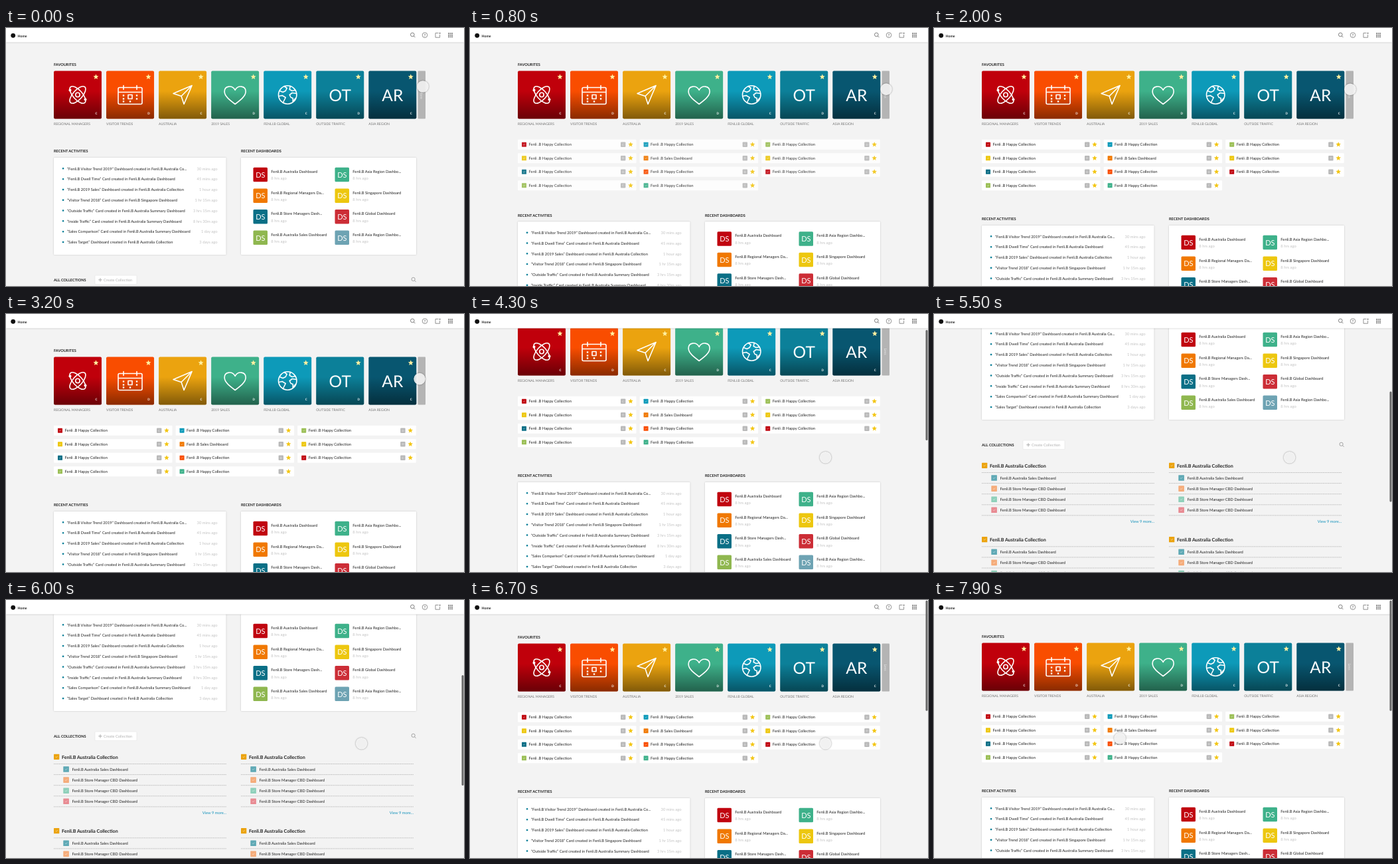
Animation, 690 px wide and 388 px high, one loop 8000 ms. Source, as an HTML page:

```html
<!DOCTYPE html>
<html lang="en">
<head>
<meta charset="utf-8">
<title>Dashboard home</title>
<style>
  html, body { margin: 0; width: 100%; height: 100%; overflow: hidden; background: #f3f3f3; }
  svg { display: block; width: 690px; height: 388px; font-family: Lato, sans-serif; text-rendering: geometricPrecision; }
  text { fill: #222; white-space: pre; }
  .bold { font-weight: 700; }
  .line { fill: none; stroke: #fff; stroke-width: 1.6; stroke-linecap: round; stroke-linejoin: round; }
  .tool { fill: none; stroke: #777; stroke-width: .8; }
  .panel { fill: #fff; filter: drop-shadow(0 .7px 1px #0003); }
  #cursor { fill: #fff; fill-opacity: .86; filter: drop-shadow(0 .5px 1.3px #0007); }
</style>
</head>
<body>
<svg viewBox="0 0 690 388">
  <defs>
    <linearGradient id="shade" x2="0" y2="1">
      <stop offset=".42" stop-opacity="0"/><stop offset="1" stop-opacity=".45"/>
    </linearGradient>
  </defs>
  <rect width="690" height="388" fill="#f3f3f3"/>
  <g id="page"><g id="favourites"></g><g id="extra"></g><g id="lower"></g></g>
  <g id="header"></g>
  <rect id="thumb" x="686.5" width="3" height="166" rx="1.5" fill="#686868"/>
  <circle id="cursor" r="8.8"/>
</svg>
<script>
const $ = id => document.getElementById(id);
const BRAND = 'Fenli.B';
const GREY = 'fill="#c2c2c2" style="fill:#c2c2c2"';
const END = 'text-anchor="end"', MID = 'text-anchor="middle"';
const ink = c => `style="fill:${c}"`;

// y is the middle of the capitals
const text = (x, y, size, str, attrs = '') =>
  `<text x="${x}" y="${y + size * .36}" font-size="${size}" ${attrs}>${str}</text>`;
const rect = (x, y, w, h, fill, r = 0, attrs = '') =>
  `<rect x="${x}" y="${y}" width="${w}" height="${h}" rx="${r}" fill="${fill}" ${attrs}/>`;
const path = (d, cls = 'line') => `<path class="${cls}" d="${d}"/>`;
const title = (x, y, str) => text(x, y, 5.6, str, 'class="bold"');
const star = (x, y, r, fill) => {
  const pts = Array.from({ length: 10 }, (_, i) => {
    const a = i * Math.PI / 5, q = i % 2 ? r * .45 : r;
    return `${x + q * Math.sin(a)},${y - q * Math.cos(a)}`;
  });
  return `<polygon points="${pts.join(' ')}" fill="${fill}"/>`;
};
const badge = (x, y, s, fill) => rect(x, y - s / 2, s, s, fill, .6) +
  `<path d="M${x + s * .32} ${y}l${s * .14} ${s * .13} ${s * .24} -${s * .26}" fill="none" stroke="#fffb" stroke-width=".6"/>`;

// Icons are centred on 0,0
const orbit = a => `<ellipse class="line" rx="16" ry="7" transform="rotate(${a})"/>`;
const letters = s => text(0, 0.3, 24.5, s, `${MID} ${ink('#fff')}`);
const icons = [
  orbit(48) + orbit(-48) + '<circle class="line" r="3.2"/>' +
    '<g fill="#fff"><circle cx="-11.5" cy="-7" r="2"/><circle cx="11.5" cy="7" r="2"/></g>',
  path('M-16 -11H16Q18 -11 18 -9V12Q18 14 16 14H-16Q-18 14 -18 12V-9Q-18 -11 -16 -11ZM-18 -4H18M-10 -14V-8M10 -14V-8') +
    path('M-3 0H3V6H-3Z') +
    [[-10, 1], [10, 1], [-10, 6], [10, 6], [-10, 10], [0, 10]].map(([x, y]) => rect(x - 1.2, y - 1.2, 2.4, 2.4, '#fff')).join(''),
  path('M14 -14L-14 -2L-2 2L2 14ZM-2 2L14 -14'),
  path('M0 14C-8 8 -16 2 -16 -5C-16 -14 -4 -15 0 -7C4 -15 16 -14 16 -5C16 2 8 8 0 14Z'),
  '<circle class="line" r="13.7"/>' +
    path('M-12 -6L-7 -4L-3 -6L-1 -10L-5 -13M-13 2L-8 1L-3 4L-5 8L-7 12M4 -13L3 -8L7 -6L12 -7M13 -2L7 -3L3 0L5 4L8 5L8 10L12 5'),
  letters('OT'), letters('AR')
];

const cards = [
  ['REGIONAL MANAGERS', '#c0000b'], ['VISITOR TRENDS', '#f94d00'], ['AUSTRALIA', '#eba30f'],
  ['2019 SALES', '#3eb18a'], [BRAND.toUpperCase() + ' GLOBAL', '#0d9ab9'],
  ['OUTSIDE TRAFFIC', '#0c8099'], ['ASIA REGION', '#085670']
];
$('favourites').innerHTML = title(72, 54.7, 'FAVOURITES') + cards.map(([name, fill], i) => {
  const x = 72 + 79.05 * i;
  return rect(x, 64.5, 72, 72, fill, 2) + rect(x, 64.5, 72, 72, 'url(#shade)', 2) +
    `<g transform="translate(${x + 36} 100.5)">${icons[i]}</g>` +
    star(x + 63.5, 73.5, 4.2, '#fff0a0') +
    text(x + 64, 128.3, 4.6, 'CD'[i % 2], `class="bold" ${MID} ${ink('#fff')}`) +
    text(x, 144.2, 5.15, name, ink('#777'));
}).join('') + rect(620.5, 64.5, 11.5, 72, '#b4b4b4', 1) +
  `<g transform="translate(626.3 100.5) rotate(90)"><text id="toggle" y="1.8" font-size="5.4" ${MID} ${ink('#e6e6e6')}></text></g>`;

const tints = ['#c0040f', '#0d9ab9', '#9bbf56', '#edc70f', '#f07800', '#edc70f', '#0a6f86', '#f94d00', '#c0040f', '#9bbf56', '#3eb18a'];
$('extra').innerHTML = tints.map((fill, i) => {
  const x = 72 + 183.6 * (i % 3), y = 175.2 + 20.55 * Math.floor(i / 3);
  return rect(x, y - 7.5, 178.5, 15, '#fff', 1) + badge(x + 6, y, 7, fill) +
    text(x + 16.5, y, 5.85, `Fenli .B ${i === 4 ? 'Sales Dashboard' : 'Happy Collection'}`) +
    rect(x + 155, y - 3.7, 7.4, 7.4, '#b9b9b9', 1) +
    text(x + 158.7, y, 4, 'CCDDDDDDCCC'[i], `${MID} ${ink('#eee')}`) +
    star(x + 170, y, 4, '#f3c614');
}).join('');

const activities = [
  [`“${BRAND} Visitor Trend 2019” Dashboard created in ${BRAND} Australia Co...`, '30 mins ago'],
  [`“${BRAND} Dwell Time” Card created in ${BRAND} Australia Dashboard`, '45 mins ago'],
  [`“${BRAND} 2019 Sales” Dashboard created in ${BRAND} Australia Collection`, '1 hour ago'],
  [`“Visitor Trend 2018” Card created in ${BRAND} Singapore Dashboard`, '1 hr 15m ago'],
  [`“Outside Traffic” Card created in ${BRAND} Australia Summary Dashboard`, '3 hrs 15m ago'],
  [`“Inside Traffic” Card created in ${BRAND} Australia Summary Dashboard`, '8 hrs 30m ago'],
  [`“Sales Comparison” Card created in ${BRAND} Australia Summary Dashboard`, '1 day ago'],
  [`“Sales Target” Dashboard created in ${BRAND} Australia Collection`, '3 days ago']
];
const dashboards = [
  ['Australia Dashboard', '#c0040f'], ['Asia Region Dashbo...', '#3eb18a'],
  ['Regional Managers Da...', '#f07800'], ['Singapore Dashboard', '#edc70f'],
  ['Store Managers Dash...', '#0a6f86'], ['Global Dashboard', '#cc2d36'],
  ['Australia Sales Dashboard', '#8fb74f'], ['Asia Region Dashbo...', '#6ea3b3']
];
const rows = [
  ['Australia Sales', '#5fa9b5'], ['Store Manager CBD', '#f5ac7a'],
  ['Store Manager CBD', '#8fd0ba'], ['Store Manager CBD', '#e88a92']
];

const collection = (_, n) => {
  const x = 72 + 282 * (n % 2), y = 410.5 + 111.3 * Math.floor(n / 2);
  const rule = i => `<path d="M${x} ${y + 10 + 16.1 * i}h260" stroke="#a4a4a4" stroke-width=".7" stroke-dasharray="1 .6"/>`;
  return badge(x, y - .7, 8.3, '#eba30f') +
    text(x + 12, y, 7.1, `${BRAND} Australia Collection`, 'class="bold"') + rule(4) +
    rows.map(([name, fill], i) => rule(i) + badge(x + 14.3, y + 18 + 16.1 * i, 8.6, fill) +
      text(x + 27.5, y + 18 + 16.1 * i, 5.8, `${BRAND} ${name} Dashboard`)).join('') +
    text(x + 260, y + 83, 5.8, 'View 9 more...', `${END} ${ink('#1492bb')}`);
};

const lens = (x, y, r, colour = '#777') =>
  `<g fill="none" stroke="${colour}" stroke-width=".9"><circle cx="${x}" cy="${y}" r="${r}"/><path d="M${x + r * .7} ${y + r * .7}l2.2 2.2"/></g>`;

$('lower').innerHTML = title(72, 185.2, 'RECENT ACTIVITIES') + title(354, 185.2, 'RECENT DASHBOARDS') +
  rect(72, 195, 259.5, 146, '#fff', 1, 'class="panel"') + rect(354, 195, 264, 146, '#fff', 1, 'class="panel"') +
  activities.map(([what, when], i) => {
    const y = 211.5 + 15.8 * i;
    return rect(84.8, y - 1.4, 2.5, 2.5, '#0f8099', .8) + text(92, y, 5.8, what) + text(318.5, y, 5.85, when, `${END} ${GREY}`);
  }).join('') +
  dashboards.map(([name, fill], i) => {
    const x = 372.5 + 123 * (i % 2), y = 209.8 + 31.6 * Math.floor(i / 2);
    return rect(x, y, 21.5, 21.5, fill, 1.5) + text(x + 10.8, y + 11, 11, 'DS', `${MID} ${ink('#fff')}`) +
      text(x + 26.8, y + 6.2, 5.8, `${BRAND} ${name}`) + text(x + 26.8, y + 16.4, 5.85, '8 hrs ago', GREY);
  }).join('') +
  title(72, 378.7, 'ALL COLLECTIONS') + rect(134, 372, 63, 13.6, '#fff', 1, 'stroke="#e4e4e4" stroke-width=".6"') +
  '<path d="M139.3 378.8h5.4m-2.7 -2.7v5.4" stroke="#aaa" stroke-width="1"/>' +
  text(147, 378.8, 5.7, 'Create Collection', ink('#b2b2b2')) + lens(613.6, 377.8, 2.6, '#999') +
  Array.from({ length: 8 }, collection).join('');

$('header').innerHTML = rect(0, 0, 690, 21.5, '#fff', 0, 'style="filter:drop-shadow(0 .6px 1px #0004)"') +
  '<circle cx="10.7" cy="11.3" r="3.4" fill="#111"/>' + text(17.5, 11.7, 5.2, 'Home', 'class="bold"') +
  lens(612.3, 10, 2.8) + '<circle class="tool" cx="631" cy="10.7" r="3.8"/>' +
  text(631, 10.7, 5.4, '?', `class="bold" ${MID} ${ink('#666')}`) +
  path('M651.5 7.6H647V14.2H653.6V10', 'tool') + '<circle cx="653.6" cy="7.8" r="1.1" fill="#888"/>' +
  Array.from({ length: 9 }, (_, i) => rect(666 + 2.6 * (i % 3), 7.2 + 2.6 * Math.floor(i / 3), 1.9, 1.9, '#888')).join('');

// Motion: keys are [input, value] pairs
const ease = p => p * p * (3 - 2 * p);
const follow = (keys, t, curve = p => p) => {
  if (t <= keys[0][0]) return keys[0][1];
  const i = keys.findIndex(k => k[0] >= t);
  if (i < 0) return keys[keys.length - 1][1];
  const [t0, a] = keys[i - 1], [t1, b] = keys[i];
  return a + (b - a) * curve((t - t0) / (t1 - t0));
};
const openKeys = [[200, 0], [900, 1]];
const cursorX = [[100, 628], [900, 627], [3100, 627], [3900, 535.6], [7000, 535.6], [7900, 280]];
const cursorY = [[100, 88], [900, 92.3], [3100, 92.3], [3900, 215.8], [7000, 215.8], [7900, 208]];
const scrollKeys = [[4000, 0], [4100, 6], [4300, 44], [4500, 88], [4700, 126], [4900, 156], [5100, 176], [5300, 224],
  [5500, 284], [5700, 318], [5800, 316], [6000, 276], [6200, 170], [6400, 62], [6550, 14], [6700, -1], [6900, 0]];
const thumbKeys = [[0, .8], [44, 24], [176, 77], [276, 113], [320, 132]];

function draw(now) {
  const t = Math.floor(now % 8000 / 100) * 100;
  const open = follow(openKeys, t, ease), scroll = follow(scrollKeys, t);
  $('page').setAttribute('transform', `translate(0 ${-scroll})`);
  $('lower').setAttribute('transform', `translate(0 ${102 * open})`);
  $('extra').setAttribute('opacity', open * open);
  $('toggle').textContent = open < .5 ? 'More' : 'Less';
  $('thumb').setAttribute('y', follow(thumbKeys, scroll));
  $('thumb').setAttribute('opacity', t >= 4100 ? 1 : 0);
  $('cursor').setAttribute('cx', follow(cursorX, t, ease));
  $('cursor').setAttribute('cy', follow(cursorY, t, ease));
  requestAnimationFrame(() => draw(performance.now()));
}
draw(0);
</script>
</body>
</html>
```
